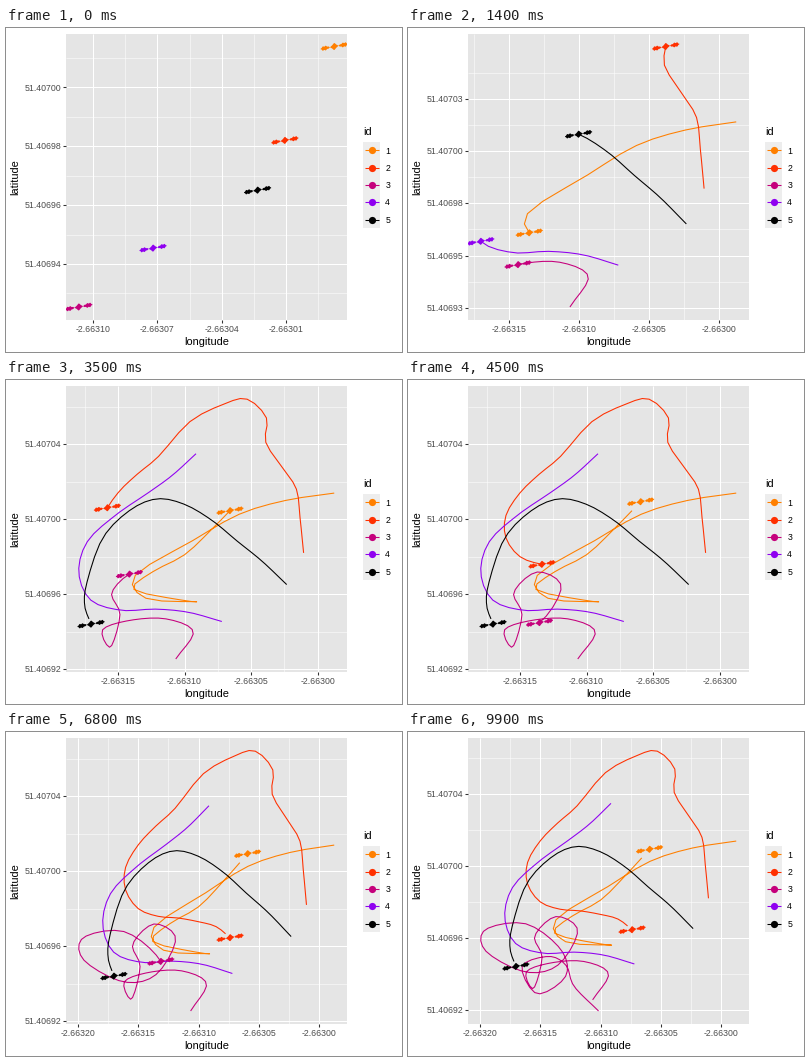
A matplotlib script that plays this animation: 396x324 px, repeating every 10 s.

```python
import numpy as np
import matplotlib.pyplot as plt
from matplotlib.animation import FuncAnimation
from matplotlib.patches import Polygon, Rectangle

W, H, DPI = 396, 324, 100
FRAMES, STEP_MS = 100, 100
LEFT, RIGHT, TOP, BOTTOM = 60, 341, 5.5, 292
LON0, LAT0 = -2663200, 51406900   # micro-degrees
PT = 72 / DPI                     # points per pixel
GREY, INK = "#333333", "#4D4D4D"

plt.rcParams["font.family"] = ["Liberation Sans", "DejaVu Sans"]


class Track:
    """A flight through key points that are evenly spaced in time."""

    def __init__(self, color, last, stays, points):
        self.color, self.last, self.stays = color, last, stays
        self.path = spline(np.array(points, float), last + 1)

    def state(self, i):
        """Trail and bat position at step i (no bat once it has left)."""
        if i < self.last:
            return self.path[:i + 1], self.path[i]
        if self.stays:
            return self.path[:-1], self.path[-1]
        return self.path, None


def spline(p, count):
    """Samples of the Catmull-Rom curve through the points."""
    q = np.vstack([2 * p[0] - p[1], p, 2 * p[-1] - p[-2]])
    u = np.linspace(0, len(p) - 1, count)
    k = np.minimum(u.astype(int), len(p) - 2)
    u = (u - k)[:, None]
    a, b, c, d = (q[k + n] for n in range(4))
    return b + u / 2 * (c - a + u * (2 * a - 5 * b + 4 * c - d
                                     + u * (3 * (b - c) + d - a)))


TRACKS = [
    Track("#FF7F00", 36, True, [
        (212.4, 113.9), (176, 110), (141, 102.6), (106, 88.5), (63, 70),
        (71, 57.8), (108, 56), (98, 56.8), (62, 62.5), (76.3, 72),
        (100, 81), (121, 95), (140.6, 109.3)]),
    Track("#FF3000", 57, True, [
        (189.4, 82), (186.7, 101), (184, 116), (174, 127), (161, 141),
        (161.5, 154), (147, 164), (130, 161.5), (104, 152), (80.5, 133.5),
        (64.5, 124), (50, 114), (39.5, 102), (39.5, 90), (50, 80),
        (66.5, 75.9), (83, 75), (100, 73), (114.5, 70.4), (126.1, 64.5)]),
    Track("#C5007C", 99, False, [
        (93.4, 25.4), (106.5, 40), (86, 46.8), (59, 46), (38.5, 41),
        (44.5, 31.8), (51.5, 49.1), (45.5, 61), (63, 71.8), (81, 64),
        (64.7, 44.8), (37.5, 41), (5, 52.5), (4.5, 64.5), (38, 67.8),
        (67, 53.5), (71, 38.5), (47.5, 28.8), (35, 44), (57, 49.6),
        (71.5, 44.5), (78, 33), (98.3, 19.2)]),
    Track("#8F00F0", 35, False, [
        (128, 45.4), (103, 50.3), (78, 52), (52.5, 51.4), (29.6, 56.8),
        (20.6, 71.5), (27, 88), (48, 102), (73, 114.2), (91, 123.5),
        (108.6, 134.9)]),
    Track("#000000", 35, True, [
        (176.7, 65.1), (158, 77.7), (139.5, 88.3), (120.5, 99.4),
        (99.6, 108), (79, 110.8), (58.5, 104.5), (38.5, 89.8),
        (26.8, 66.5), (25, 54), (29.8, 44)]),
]


def bat_outline():
    """Tilted silhouette in pixels: thin arms, two wings and a body."""
    x = np.linspace(-13.5, 13.5, 55)
    wings = 1.5 * np.exp(-((np.abs(x) - 9.5) / 3.2) ** 4)
    body = 2.6 * np.exp(-(x / 2.2) ** 4)
    half = 0.5 + wings + body + 0.4 * np.cos(2.2 * x)
    mid = -0.18 * x
    return np.vstack([np.column_stack([x, mid - half]),
                      np.column_stack([x, mid + half])[::-1]])


BAT = bat_outline()


def pretty_step(lo, hi, m=5):
    """Best tick step for a range (extended Wilkinson scoring)."""
    span, best = hi - lo, (-9, 1)
    for rank, q in enumerate((1, 5, 2, 2.5, 4, 3)):
        for step in (q, q * 10, q * 100):
            if not span / 10 < step < span:
                continue
            for k in range(2, 10):
                first = int(lo // step)
                for n in range(first - 1, first + 3):
                    a, b = n * step, (n + k - 1) * step
                    cover = 1 - 0.5 * ((hi - b) ** 2 + (lo - a) ** 2) / (0.1 * span) ** 2
                    r = (max(b, hi) - min(a, lo)) / step / (m - 1)
                    density = 2 - max(r, 1 / r)
                    score = 0.25 * (-rank / 5) + 0.2 * cover + 0.5 * density
                    if score > best[0]:
                        best = score, step
    return best[1]


def ticks(lo, hi, top):
    """Major (up to the data's top) and minor tick values in the range."""
    step = pretty_step(lo, hi)
    halves = np.arange(np.ceil(2 * lo / step), np.floor(2 * hi / step) + 1)
    major, minor = (halves[halves % 2 == r] * step / 2 for r in (0, 1))
    return major[major <= top], minor


def tick_labels(values, most):
    """Shared number of decimals, as few as needed and at most `most`."""
    unit = 10 ** (6 - most)
    vals = [(int(round(v)) + unit // 2) // unit for v in values]
    while most > 1 and all(v % 10 == 0 for v in vals):
        vals, most = [v // 10 for v in vals], most - 1
    return [f"{v / 10 ** most:.{most}f}" for v in vals]


class Scale:
    """Maps data, with 5 % padding, to a pixel range."""

    def __init__(self, values, origin, start, stop):
        self.top, lo = values.max(), values.min()
        pad = 0.05 * (self.top - lo)
        self.lo, self.hi = lo - pad, self.top + pad
        self.origin, self.start, self.stop = origin, start, stop

    def __call__(self, v):
        return self.start + (v - self.lo) / (self.hi - self.lo) * (self.stop - self.start)

    def ticks(self, most):
        """Pixels of major and minor ticks, and the major labels."""
        o = self.origin
        major, minor = ticks(o + self.lo, o + self.hi, o + self.top)
        return self(major - o), self(minor - o), tick_labels(major, most)


fig = plt.figure(figsize=(W / DPI, H / DPI), dpi=DPI, facecolor="white")
ax = fig.add_axes([0, 0, 1, 1])
ax.set_xlim(0, W)
ax.set_ylim(H, 0)
ax.axis("off")

panel = Rectangle((LEFT, TOP), RIGHT - LEFT, BOTTOM - TOP, fc="#E5E5E5", lw=0)
ax.add_patch(panel)
drawn = []


def line(x, y, color, width, z, clip=True):
    art, = ax.plot(x, y, color=color, lw=width * PT, zorder=z,
                   solid_capstyle="butt", solid_joinstyle="round")
    if clip:
        art.set_clip_path(panel)
    return art


def label(x, y, s, size, color="black", va="baseline", **kw):
    return ax.text(x, y, s, fontsize=size * PT, color=color, va=va, **kw)


def draw_static():
    label((LEFT + RIGHT) / 2, 317, "longitude", 11, ha="center")
    label(14, (TOP + BOTTOM) / 2, "latitude", 11, rotation=90,
          ha="right", va="center")
    label(357, 107, "id", 11)
    for i, tr in enumerate(TRACKS):
        y = 122.4 + 17.28 * i
        ax.add_patch(Rectangle((357, y - 8.64), 17.28, 17.28, fc="#EDEDED", lw=0))
        line([358.7, 372.6], [y, y], tr.color, 1.07, 3, clip=False)
        ax.plot(365.64, y, "o", color=tr.color, ms=7.2 * PT, mew=0, zorder=4)
        label(379.2, y + 3.2, str(i + 1), 8.8)


def draw_axes(px, py):
    xs, xm, xnames = px.ticks(6)
    ys, ym, ynames = py.ticks(5)
    for cols, rows, width, z in ((xm, ym, 0.53, 1), (xs, ys, 1.07, 2)):
        drawn.extend(line([x, x], [TOP, BOTTOM], "white", width, z) for x in cols)
        drawn.extend(line([LEFT, RIGHT], [y, y], "white", width, z) for y in rows)
    for x, s in zip(xs, xnames):
        drawn.append(line([x, x], [BOTTOM, BOTTOM + 2.75], GREY, 1.07, 2, False))
        drawn.append(label(x, 303.6, s, 8.8, INK, ha="center"))
    for y, s in zip(ys, ynames):
        drawn.append(line([LEFT - 2.75, LEFT], [y, y], GREY, 1.07, 2, False))
        drawn.append(label(55.2, y + 3.2, s, 8.8, INK, ha="right"))


def draw_bat(x, y, color):
    shape = Polygon(BAT + (x, y), fc=color, lw=0, zorder=4)
    ax.add_patch(shape)
    shape.set_clip_path(panel)
    return shape


def update(i):
    while drawn:
        drawn.pop().remove()
    states = [tr.state(i) for tr in TRACKS]
    seen = np.vstack([trail for trail, _ in states])
    px = Scale(seen[:, 0], LON0, LEFT, RIGHT)
    py = Scale(seen[:, 1], LAT0, BOTTOM, TOP)
    draw_axes(px, py)
    for tr, (trail, bat) in zip(TRACKS, states):
        drawn.append(line(px(trail[:, 0]), py(trail[:, 1]), tr.color, 1.07, 3))
        if bat is not None:
            drawn.append(draw_bat(px(bat[0]), py(bat[1]), tr.color))
    return drawn


draw_static()
anim = FuncAnimation(fig, update, frames=FRAMES, interval=STEP_MS,
                     init_func=lambda: update(0), repeat=True, repeat_delay=0)
plt.show()
```
